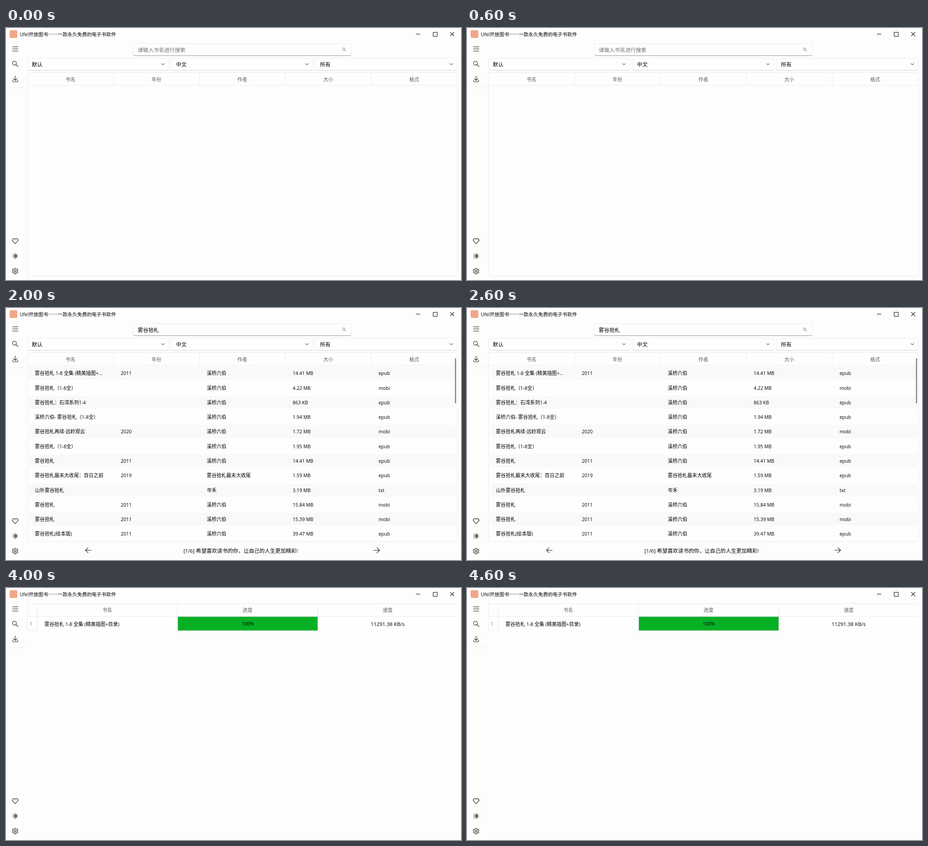
Write an HTML page that moves like this. It is 1005 px wide and 557 px high and loops after 5000 ms.

```html
<!DOCTYPE html>
<html lang="zh-CN">
<head>
<meta charset="utf-8">
<title>电子书</title>
<style>
html, body { margin: 0; width: 100%; height: 100%; overflow: hidden; background: #fdfdfd; }
svg { display: block; width: 1005px; height: 557px; }
text { font-family: "Noto Sans CJK SC", "Noto Sans CJK", sans-serif; white-space: pre; }
tspan { font-family: "Open Sans", "Noto Sans", sans-serif; }
.icon { fill: none; stroke: #222; stroke-width: 1.15; stroke-linecap: round; stroke-linejoin: round; }
</style>
</head>
<body>
<svg id="stage" viewBox="0 0 1005 557" xmlns="http://www.w3.org/2000/svg"></svg>
<script>
const LOOP = 5000, STEP = 1000;
const SMALL = 10.8, LARGE = 11.7;
const EDGE = '#ebebeb';
const HEAVY = 'font-weight="500"';
const BOOK = '雾谷拾札', AUTHOR = '溪桥六伯';

const rect = (x, y, w, h, fill, extra = '') =>
  `<rect x="${x}" y="${y}" width="${w}" height="${h}" fill="${fill}" ${extra}/>`;
const path = (d, extra = '') => `<path d="${d}" ${extra}/>`;
const icon = (d, extra = '') => path(d, `class="icon" ${extra}`);
const lines = (d, color = EDGE) => path(d, `fill="none" stroke="${color}"`);
const group = (id, body) => `<g id="${id}">${body}</g>`;

// Text centred vertically on y; Latin runs are set slightly smaller than Chinese.
function text(x, y, str, size = SMALL, fill = '#000', extra = '') {
  const runs = str.replace(/[\x20-\x7e·]+/g, run => `<tspan font-size="${size * 0.97}">${run}</tspan>`);
  return `<text x="${x}" y="${y + size * 0.375}" font-size="${size}" fill="${fill}" ${extra}>${runs}</text>`;
}
const centered = (x, y, str, size, fill, extra = '') =>
  text(x, y, str, size, fill, `text-anchor="middle" ${extra}`);

function field(x, y, w, h, bottom) {
  return rect(x, y, w, h, '#fefefe', `rx="4" stroke="${EDGE}"`) +
    path(`M${x + 1} ${y + h - 2}q.6 2 3 2h${w - 8}q2.4 0 3 -2`, `fill="none" stroke="${bottom}"`);
}

function combo(x, w, label) {
  return field(x, 67, w, 26.5, '#cfcfcf') + text(x + 9.5, 80.3, label, LARGE, '#000', HEAVY) +
    icon(`M${x + w - 17} 78.5l3.2 3.2 3.2 -3.2`, 'style="stroke:#666"');
}

function gear(cx, cy) {
  const pts = [];
  for (let i = 0; i < 24; i++) {
    const a = (i - 0.5) * Math.PI / 12;
    const r = i % 4 < 2 ? 6.4 : 4.9;
    pts.push(`${(cx + r * Math.sin(a)).toFixed(2)} ${(cy - r * Math.cos(a)).toFixed(2)}`);
  }
  return icon(`M${pts.join('L')}Z`) + `<circle class="icon" cx="${cx}" cy="${cy}" r="2.1"/>`;
}

function sun(cx, cy) {
  let rays = '';
  for (let i = 0; i < 8; i++) {
    const a = i * Math.PI / 4, s = Math.sin(a), c = Math.cos(a);
    rays += `M${cx + 5.4 * c} ${cy + 5.4 * s}L${cx + 6.2 * c} ${cy + 6.2 * s}`;
  }
  return icon(rays) + `<circle class="icon" cx="${cx}" cy="${cy}" r="3.1"/>` +
    path(`M${cx} ${cy - 3}a3 3 0 0 1 0 6z`, 'fill="#222"');
}

function frameParts() {
  return rect(8, 5, 17, 17, '#f3a58c', 'rx="3"') +
    text(30.5, 14, 'Ufel开放图书——一款永久免费的电子书软件', 10.72, '#000') +
    lines('M905.5 13.5h9.5', '#000') +
    lines('M943.5 9.5h9v9h-9z', '#000') +
    path('M981.3 9.3l8.6 8.6m0 -8.6l-8.6 8.6', 'fill="none" stroke="#000" stroke-width="1.1"') +
    path('M14 41.6h13M14 46.2h13M14 50.8h13', 'stroke="#444" stroke-width="1.2"') +
    `<circle class="icon" cx="18.7" cy="77.8" r="4.3"/>` + icon('M21.9 81l4.6 4.6') +
    icon('M20.3 106v9.6M16.2 111.8l4.1 4.1 4.1 -4.1M14.8 115.5v1.8q0 1.7 1.7 1.7h7.6q1.7 0 1.7 -1.7v-1.8') +
    lines('M0 131.8h40') +
    icon('M20.3 476.6l-5.4 -5.4a3.4 3.4 0 0 1 4.8 -4.8l.6 .6 .6 -.6a3.4 3.4 0 0 1 4.8 4.8z') +
    sun(20.3, 504) + gear(20.3, 537.3) +
    path('M47.5 541v3.5q0 4.5 4.5 4.5h940.5q4.5 0 4.5 -4.5v-3.5', 'fill="none" stroke="#f8f8f8"');
}

function searchBar() {
  return field(281, 34.5, 481.5, 26.5, '#929792') +
    `<circle cx="746" cy="46.8" r="2.7" fill="none" stroke="#777"/>` +
    lines('M748 48.8l2.8 2.8', '#777') +
    combo(47.5, 313, '默认') + combo(366, 312.5, '中文') + combo(684, 313.5, '所有');
}

function tableHead() {
  return lines('M48 127h949M237.8 99v28M427.5 99v28M617.2 99v28M806.7 99v28') +
    ['书名', '年份', '作者', '大小', '格式']
      .map((s, i) => centered(142.4 + i * 189.8, 113.6, s, SMALL, '#606060')).join('');
}

const card = bottom => rect(47.5, 98.5, 949.5, bottom - 98.5, '#fefefe', `rx="5" stroke="${EDGE}"`);

const books = [
  [BOOK + ' 1-8 全集 (精美插图+...', '2011', AUTHOR, '14.41 MB', 'epub'],
  [BOOK + '（1-8全）', '', AUTHOR, '4.22 MB', 'mobi'],
  [BOOK + '：石湾系列1-4', '', AUTHOR, '863 KB', 'epub'],
  [AUTHOR + '- ' + BOOK + '（1-8全）', '', AUTHOR, '1.94 MB', 'epub'],
  [BOOK + '再续·远岭观云', '2020', AUTHOR, '1.72 MB', 'mobi'],
  [BOOK + '（1-8全）', '', AUTHOR, '1.95 MB', 'epub'],
  [BOOK, '2011', AUTHOR, '14.41 MB', 'epub'],
  [BOOK + '最末大收尾：百日之前', '2019', BOOK + '最末大收尾', '1.59 MB', 'epub'],
  ['山外' + BOOK, '', '岑禾', '3.19 MB', 'txt'],
  [BOOK, '2011', AUTHOR, '15.84 MB', 'mobi'],
  [BOOK, '2011', AUTHOR, '15.39 MB', 'mobi'],
  [BOOK + '(绘本版)', '2011', AUTHOR, '39.47 MB', 'epub']
];

function bookRow(cells, i) {
  const y = 144.3 + i * 32.28;
  const stripe = i % 2 ? '' : rect(51, y - 14.8, 943, 29, '#f9f9f9', `rx="4" ${i ? '' : 'id="first"'}`);
  const mark = i ? '' : rect(51, 136.5, 3, 14.5, '#009faa', 'rx="1.5" id="mark"');
  return stripe + mark + cells.map((s, c) => s && text(63.8 + c * 189.8, y, s)).join('');
}

function results() {
  return books.map(bookRow).join('') +
    rect(991.6, 111, 2.6, 99.5, '#858585', 'rx="1.3"') +
    icon('M188.3 535.5h-12.6M181.3 529.8l-5.8 5.7 5.8 5.7') +
    icon('M812.3 535.5h12.6M819.3 529.8l5.8 5.7 -5.8 5.7') +
    text(392, 536.4, '[1/6] 希望喜欢读书的你，让自己的人生更加精彩!', LARGE);
}

function downloads() {
  return rect(47, 34, 951, 61, '#fefefe') +
    lines('M998 34.5H47.5V94.3H69.2V34.5M47.5 62.5H998M378.7 34.5v28M688.6 34.5v28') +
    centered(223.5, 48.8, '书名', SMALL, '#606060') +
    centered(533.4, 48.8, '进度', SMALL, '#606060') +
    centered(843, 48.8, '速度', SMALL, '#606060') +
    text(52, 79, '1', SMALL, '#777') +
    text(85, 79.6, BOOK + ' 1-8 全集 (精美插图+目录)', SMALL, '#000', HEAVY) +
    rect(379.4, 63.4, 308.9, 30.6, '#06b025', 'stroke="#bcbcbc" stroke-width=".5"') +
    centered(534, 79.2, '100%', SMALL, '#000', HEAVY) +
    centered(843, 79.6, '11291.38 KB/s', LARGE, '#000');
}

const $ = id => document.getElementById(id);
$('stage').innerHTML = rect(0, 0, 1005, 557, '#fdfdfd') + frameParts() +
  group('search', searchBar() +
    group('hint', text(291, 48.7, '请输入书名进行搜索', LARGE, '#707070')) +
    group('query', text(291, 48.2, BOOK, LARGE, '#000', HEAVY))) +
  group('empty', card(549)) +
  group('list', card(516)) +
  group('head', tableHead()) +
  group('results', results()) +
  group('downloads', downloads());

const show = (id, on) => { $(id).style.display = on ? '' : 'none'; };

function draw(time) {
  const step = Math.floor(time % LOOP / STEP);
  const listed = step === 2 || step === 3;
  show('search', step < 4);
  show('hint', step === 0);
  show('query', step > 0);
  show('empty', step < 2);
  show('list', listed);
  show('head', step < 4);
  show('results', listed);
  show('mark', step === 3);
  $('first').setAttribute('fill', step === 3 ? '#ededed' : '#f9f9f9');
  show('downloads', step === 4);
}

const start = performance.now();
function tick() {
  draw(performance.now() - start);
  requestAnimationFrame(tick);
}
tick();
</script>
</body>
</html>
```
